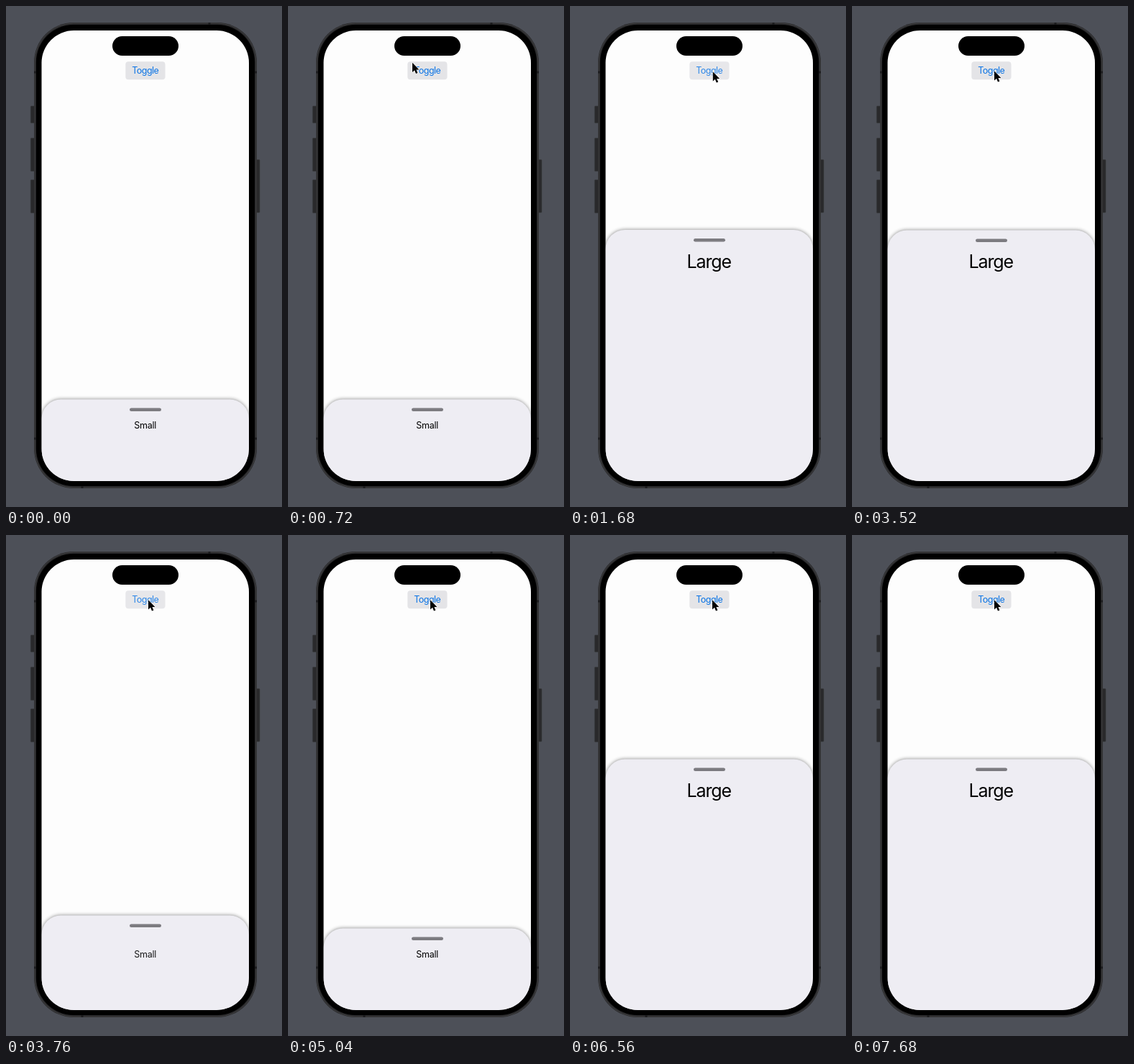
These frames come from a looping animation (384x696 px, 8000 ms). An HTML page:

```html
<!DOCTYPE html>
<html lang="en">
<head>
<meta charset="utf-8">
<title>Sheet toggle</title>
<style>
  html, body { margin: 0; width: 100%; height: 100%; overflow: hidden; background: #4d5058; }
  svg { display: block; width: 100vw; height: 100vh; }
  text { font-family: Inter, "Open Sans", sans-serif; text-anchor: middle; }
</style>
</head>
<body>
<svg viewBox="0 0 384 696">
  <defs>
    <clipPath id="screen"><rect x="49.5" y="34" width="288.5" height="626" rx="45"/></clipPath>
    <clipPath id="inside"><rect id="window" x="49" width="290" height="400"/></clipPath>
    <filter id="blur" x="-10%" y="-10%" width="120%" height="120%"><feGaussianBlur stdDeviation="2.6"/></filter>
  </defs>

  <rect width="384" height="696" fill="#4d5058"/>

  <g fill="#29292b" stroke="#38393c" stroke-width=".6">
    <rect x="34.3" y="139" width="6" height="23.5" rx="1"/>
    <rect x="34.3" y="183.5" width="6" height="46" rx="1"/>
    <rect x="34.3" y="241.5" width="6" height="46" rx="1"/>
    <rect x="347" y="213.5" width="6" height="73.5" rx="1"/>
  </g>

  <rect x="39" y="23" width="310" height="647" rx="55" fill="#28282a"/>
  <rect x="40" y="24" width="308" height="645" rx="54" fill="none" stroke="#444446" stroke-width=".8"/>
  <path d="M39 92h3M346 92h3M39 601h3M346 601h3M283 23v3M106 667v3" stroke="#1c1c1e" stroke-width="3"/>
  <rect x="42" y="26" width="304" height="641" rx="52" fill="#000"/>

  <g clip-path="url(#screen)">
    <rect x="49" y="34" width="290" height="627" fill="#fdfdfd"/>
    <g id="button">
      <rect x="166.3" y="77.3" width="55.2" height="24.9" rx="4" fill="#e4e4e7"/>
      <text x="193.8" y="94.3" font-size="12.5" letter-spacing="-.5" fill="#0b74e5">Toggle</text>
    </g>
    <g id="sheet">
      <rect x="49.5" y="-.5" width="288.5" height="420" rx="27" fill="#000" opacity=".42" filter="url(#blur)"/>
      <rect x="49.5" y="0" width="288.5" height="420" rx="27" fill="#eeedf3"/>
      <rect x="172" y="12" width="44" height="4.6" rx="2.3" fill="#7c7b80"/>
    </g>
    <g clip-path="url(#inside)" fill="#000">
      <text id="small" x="193.6" y="586.7" font-size="12.5" letter-spacing="-.3">Small</text>
      <text id="large" x="193.2" y="363.8" font-size="25" letter-spacing="-1.1">Large</text>
    </g>
  </g>
  <rect x="148" y="42" width="92" height="27" rx="13.5" fill="#000"/>

  <path id="cursor" d="M0 0V13.2L3 10.4L5 15.2L7.4 14.2L5.4 9.6H9.4Z" fill="#000" stroke="#fff" stroke-width="1.1" stroke-linejoin="round" paint-order="stroke"/>
</svg>

<script>
const LOOP = 8000, LOW = 546.5, HIGH = 311.5;
const FADE = 135;

// Each tap: when the button dims, when the sheet starts, and whether it grows.
const taps = [
  { press: 1515, start: 1518, grow: true },
  { press: 3590, start: 3640, grow: false },
  { press: 5755, start: 5758, grow: true }
];

const $ = id => document.getElementById(id);
const button = $("button"), sheet = $("sheet"), inner = $("window");
const small = $("small"), large = $("large"), cursor = $("cursor");

const clamp = x => Math.min(1, Math.max(0, x));
const mix = (a, b, k) => a + (b - a) * k;

// Slightly underdamped spring from 0 to 1.
function spring(ms) {
  if (ms <= 0) return 0;
  const w = 0.026, z = 0.8, d = w * 0.6;
  return 1 - Math.exp(-z * w * ms) * (Math.cos(d * ms) + z / 0.6 * Math.sin(d * ms));
}

function dimming(ms) {
  if (ms < 0) return 0;
  return 0.36 * clamp(ms / 30) * (1 - clamp((ms - 50) / 200));
}

function cursorAt(t) {
  const k = 1 - Math.pow(1 - clamp((t - 80) / 800), 1.2);
  const drift = clamp((t - 2160) / 480);
  return [mix(19.5, 198.8, k) - 0.8 * drift, mix(4.5, 91.3, k) - drift];
}

function draw(t) {
  let size = 0, shown = 0, dim = 0;
  for (const { press, start, grow } of taps) {
    if (t >= start) {
      const p = spring(t - start), f = clamp((t - start) / FADE);
      size = grow ? p : 1 - p;
      shown = grow ? f : 1 - f;
    }
    dim += dimming(t - press);
  }
  const top = mix(LOW, HIGH, size);
  sheet.setAttribute("transform", `translate(0 ${top})`);
  inner.setAttribute("y", top);
  small.setAttribute("opacity", 1 - shown);
  large.setAttribute("opacity", shown);
  button.setAttribute("opacity", 1 - dim);

  const [x, y] = cursorAt(t);
  cursor.setAttribute("transform", `translate(${x} ${y})`);
  cursor.setAttribute("visibility", t < 80 ? "hidden" : "visible");
}

const begin = performance.now();
function tick() {
  draw((performance.now() - begin) % LOOP);
  requestAnimationFrame(tick);
}
tick();
</script>
</body>
</html>
```
